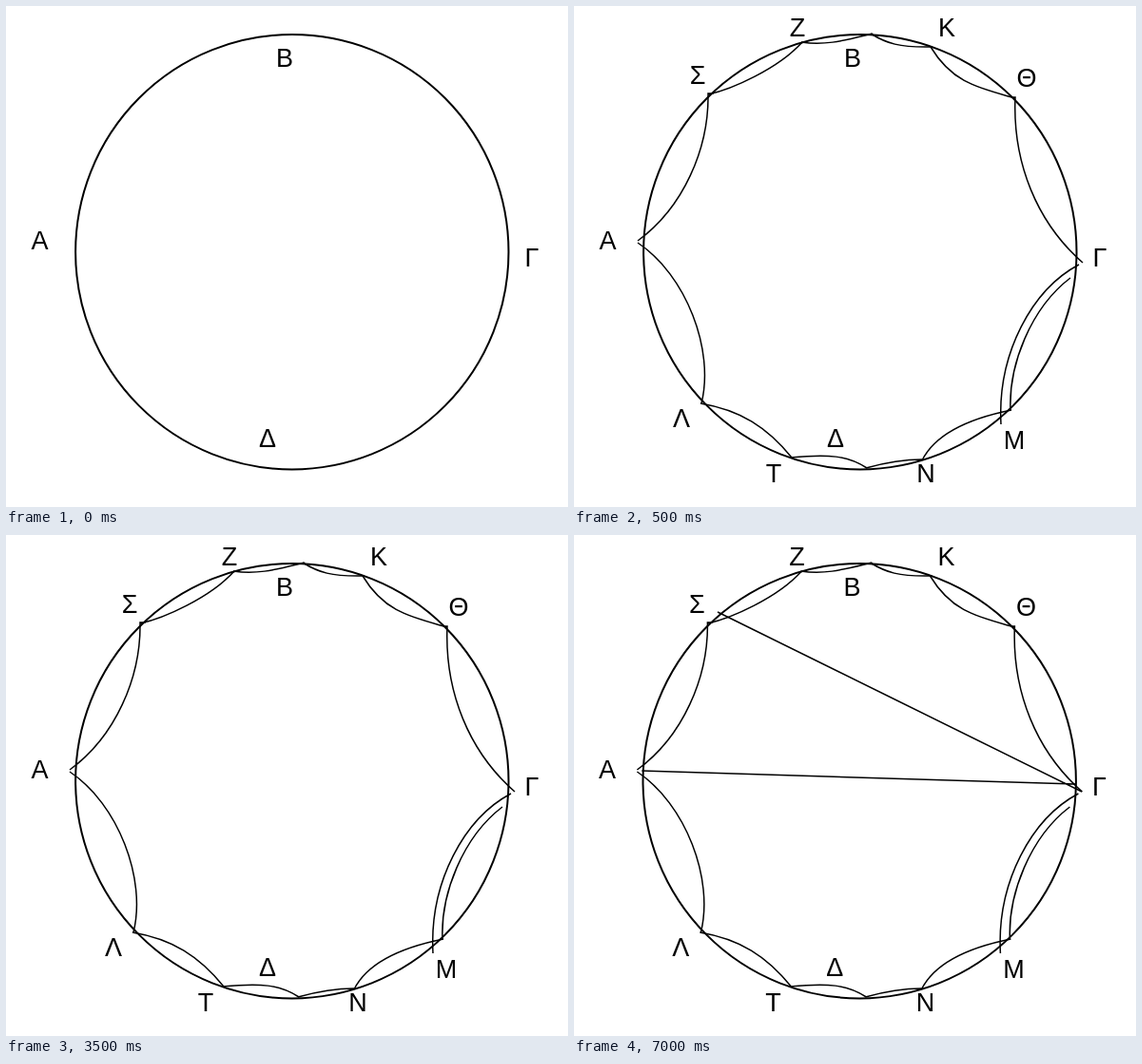
Recreate the animation shown at these times as an HTML page. Size 591 by 527 pixels, loop 8000 ms.

```html
<!DOCTYPE html>
<html lang="el">
<head>
<meta charset="utf-8">
<title>Circle and inscribed arcs</title>
<style>
  html, body { margin: 0; width: 100%; height: 100%; overflow: hidden; background: #fff; }
  svg { display: block; width: 591px; height: 527px; }
  text { font: 27px "Liberation Sans", Arial, sans-serif; text-anchor: middle; }
  .lines { fill: none; stroke: #000; stroke-width: 1.5; }
  .arcs { animation: arcs 8s step-end infinite; }
  .chords { animation: chords 8s step-end infinite; }
  .figure { animation: nudge 8s step-end infinite; }
  @keyframes arcs { 0% { visibility: hidden; } 6.25%, 100% { visibility: visible; } }
  @keyframes chords { 0% { visibility: hidden; } 68.75%, 100% { visibility: visible; } }
  @keyframes nudge { 0% { transform: none; } 68.75%, 100% { transform: translateX(-.6px); } }
</style>
</head>
<body>
<svg viewBox="0 0 591 527">
  <g class="figure">
    <ellipse class="lines" cx="300.8" cy="258.7" rx="227.7" ry="228.7" style="stroke-width:2"/>
    <text x="35.5" y="256">Α</text>
    <text x="293" y="64">Β</text>
    <text x="553" y="274">Γ</text>
    <text x="275" y="464">Δ</text>

    <g class="arcs">
      <path class="lines" d="
        M67 247C115 212 142 150 141 92H147
        M141 93C165 88 215 66 240 38
        M239 38C265 42 285 36 314 29
        M312 29C328 39 342 44 377 43
        M375 43C398 81 425 86 464 97
        M460 96H464C461 165 487 228 535 270
        M531 272C482 298 445 365 449 440
        M522 286C480 318 457 378 459 425
        M460 425C415 434 380 450 366 478
        M366 477C345 477 325 481 307 486
        M228 475C268 471 288 473 308 486
        M133 418C175 425 203 443 229 475
        M67 249C118 283 148 362 134 418"/>
      <text x="130" y="82">Σ</text>
      <text x="235" y="32">Ζ</text>
      <text x="392" y="32">Κ</text>
      <text x="476" y="85">Θ</text>
      <text x="113" y="443">Λ</text>
      <text x="210" y="501">Τ</text>
      <text x="370" y="501">Ν</text>
      <text x="463" y="466">Μ</text>
    </g>

    <path class="lines chords" d="M151.6 81L534.6 270M72 248L527.6 262"/>
  </g>
</svg>
</body>
</html>
```
